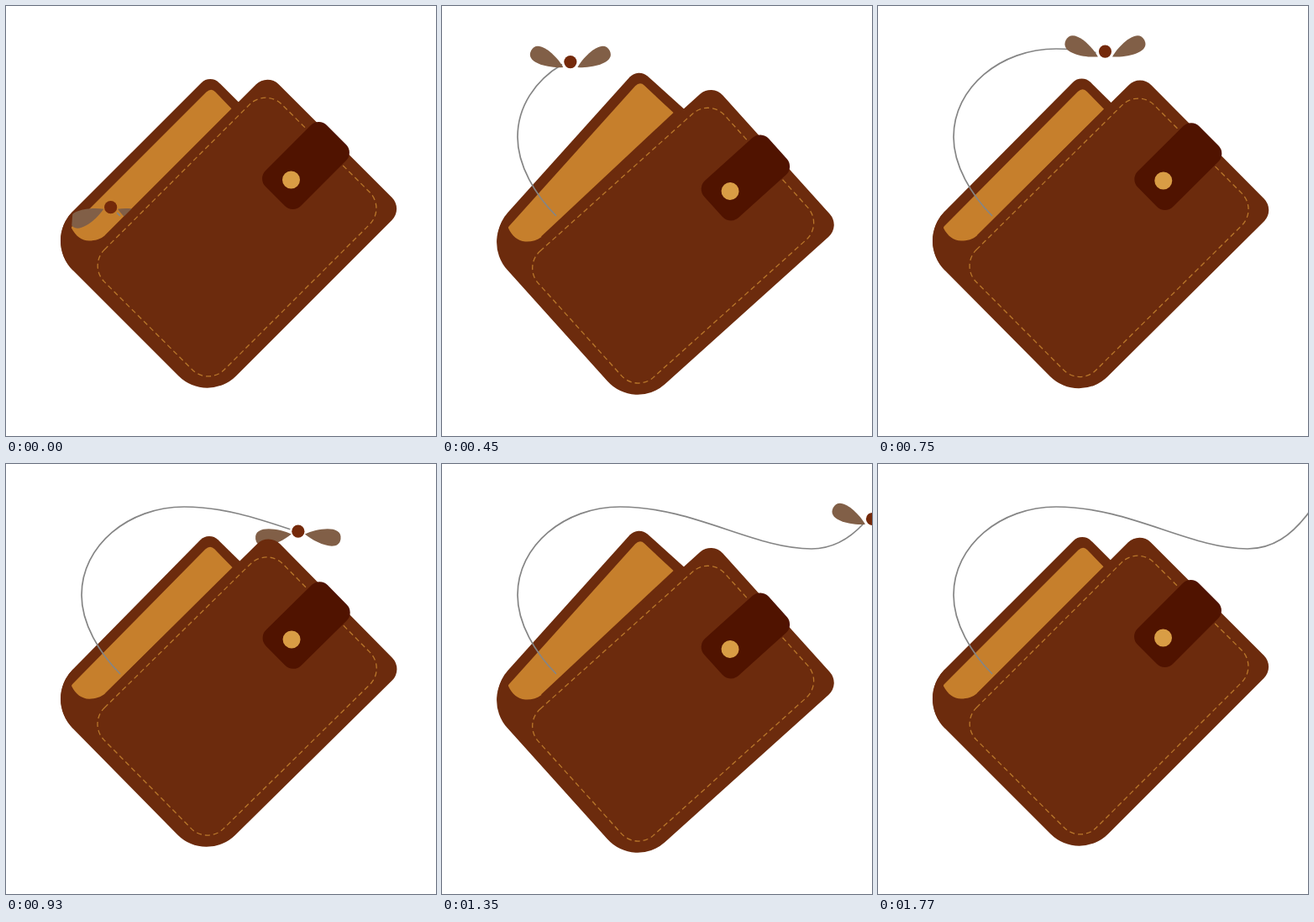
These frames come from a looping animation (512x512 px, 1.8 s). An HTML page:

```html
<!DOCTYPE html>
<html lang="en">
<head>
<meta charset="utf-8">
<title>Empty wallet</title>
<style>
  html, body { margin: 0; width: 100%; height: 100%; overflow: hidden; background: #fff; }
  svg { display: block; width: 100%; height: 100%; }
</style>
</head>
<body>
<svg viewBox="0 0 512 512">
  <defs>
    <path id="wing" d="M5 0C-9 -9 -38 -17 -38 0C-38 17 -9 9 5 0Z" fill="#815f47"/>
    <path id="route" d="M125 240C100 215 90 180 91 148C92 115 115 85 152 67C190 50 230 47 270 54C320 63 360 92 411 98C450 102 485 92 511 67C540 38 550 10 560 -30L580 -110"/>
  </defs>
  <g id="back">
    <path fill="#6c2b0d" d="M79.5 244.5L232.6 91.4A15 15 0 0 1 253.8 91.4L300 137.6L150 300L79.5 314.5A49.5 49.5 0 0 1 79.5 244.5Z"/>
    <path fill="#c67f2c" d="M78 263L238.5 102.5Q244.5 97 249.5 102.5L290 144.5L100 300L72 275Z"/>
  </g>
  <path id="lining" fill="#6c2b0d" d="M118 273L274 117L300 140L150 290Z"/>
  <path id="trail" fill="none" stroke="#858585" stroke-width="1.7"
    d="M136 250C111 225 90 190 90 156C90 97 146 51 212 51C300 51 371 101 440 101C470 101 492 85 512 59C530 36 545 10 555 -20L575 -110"/>
  <g id="fly">
    <use id="leftWing" href="#wing"/>
    <use id="rightWing" href="#wing"/>
    <circle r="7.6" fill="#74290a"/>
  </g>
  <g id="front">
    <path fill="#6c2b0d" d="M297.8 93.3A19 19 0 0 1 324.7 93.2L459.5 228A19 19 0 0 1 459.5 255L274 440.5A48.5 48.5 0 0 1 205.5 440.5L79.5 314.5A49.5 49.5 0 0 1 79.5 244.5L78 264.5C83 274 90 279.5 99 279.5C106 279.5 113 277.5 118 273Z"/>
    <g transform="rotate(-45)">
      <rect x="-149.4" y="288" width="298.8" height="202" rx="27" fill="none" stroke="#b8762a" stroke-width="1.3" stroke-dasharray="6 4"/>
      <rect x="66.5" y="357" width="103.2" height="59.5" rx="13.5" fill="#501300"/>
    </g>
    <circle cx="339.5" cy="207" r="10.5" fill="#d99d45"/>
  </g>
</svg>
<script>
const LOOP = 1800, SWING = 900, FLAP = 300;
const [back, lining, trail, route, fly, leftWing, rightWing, front] =
  ['back', 'lining', 'trail', 'route', 'fly', 'leftWing', 'rightWing', 'front']
    .map(id => document.getElementById(id));

// [time, distance flown] and [flap phase, wing angle]
const flight = [[0, 0], [210, 101], [450, 208], [750, 328], [1080, 478], [1350, 586], [1800, 778]];
const flap = [[0, -24], [.15, 0], [.4, 30], [.5, 27.5], [.6, 25], [.7, -10], [.8, -24], [1, -24]];

function lerpKeys(keys, x) {
  const i = Math.max(1, keys.findIndex(k => k[0] >= x));
  const [x0, y0] = keys[i - 1], [x1, y1] = keys[i];
  return y0 + (y1 - y0) * (x - x0) / (x1 - x0);
}

// cubic-bezier(.25, .1, .25, 1)
function ease(p) {
  if (p <= 0 || p >= 1) return Math.min(1, Math.max(0, p));
  const curve = (a, b, u) => 3 * a * u * (1 - u) ** 2 + 3 * b * u * u * (1 - u) + u ** 3;
  let lo = 0, hi = 1;
  for (let i = 0; i < 24; i++) {
    const mid = (lo + hi) / 2;
    if (curve(.25, .25, mid) < p) lo = mid; else hi = mid;
  }
  return curve(.1, 1, lo);
}

function draw(t) {
  const swing = t % SWING;
  const open = ease(swing / 240) - ease((swing - 450) / 450);
  front.setAttribute('transform', `rotate(${3 * open} 82 282)`);
  lining.setAttribute('transform', `translate(0 ${1.5 * open}) rotate(${1.9 * open} 118 273)`);
  back.setAttribute('transform', `rotate(${-3 * open} 98 260)`);

  const flown = lerpKeys(flight, t);
  const { x, y } = route.getPointAtLength(flown);
  fly.setAttribute('transform', `translate(${x} ${y})`);
  trail.setAttribute('stroke-dasharray', `${flown + 5} 9999`);

  const angle = lerpKeys(flap, t % FLAP / FLAP);
  const wing = `translate(-13 4) rotate(${angle})`;
  leftWing.setAttribute('transform', wing);
  rightWing.setAttribute('transform', `scale(-1 1) ${wing}`);
}

const start = performance.now();
function tick() {
  draw((performance.now() - start) % LOOP);
  requestAnimationFrame(tick);
}
tick();
</script>
</body>
</html>
```
